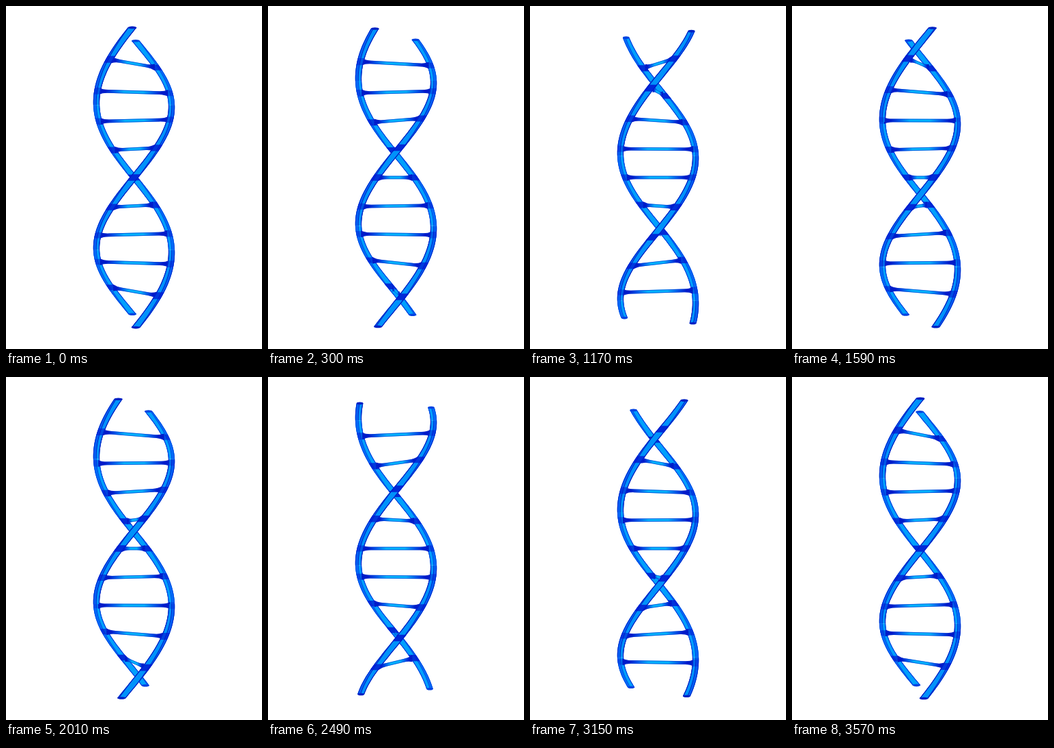
An HTML page with a canvas for the animation above (3600 ms loop, 375 by 500 pixels).

```html
<!DOCTYPE html>
<html lang="en">
<head>
<meta charset="utf-8">
<title>Rotating double helix</title>
<style>
html, body { margin: 0; width: 100%; height: 100%; overflow: hidden; background: #fff; }
canvas { display: block; width: 375px; height: 500px; }
</style>
</head>
<body>
<canvas id="stage" width="375" height="500"></canvas>
<script>
const ctx = document.getElementById('stage').getContext('2d');
const LOOP = 3600, STEP = 30;
const CX = 187.5, CY = 250;
const RADIUS = 55, HALF = 208.5, CAMERA = 1190;
const TWIST = (Math.PI - 0.045) / HALF;   // radians per unit of height
const RUNG_GAP = 41.5;
const FRONT = { core: 'rgb(0,146,250)', flank: 'rgb(0,98,246)', edge: 'rgb(0,32,196)' };
const BACK = { core: 'rgb(0,160,252)', flank: 'rgb(0,108,248)', edge: 'rgb(0,66,226)' };

// Projects the strand centre at height h (upwards) and gives its half-width.
function strandAt(h, turn) {
  const a = h * TWIST + turn;
  const facing = Math.cos(a);
  const scale = CAMERA / (CAMERA - RADIUS * facing);
  return {
    x: CX + RADIUS * Math.sin(a) * scale,
    y: CY - h * scale,
    side: Math.sin(a),
    facing,
    w: (4.6 + 1.5 * facing * facing) * scale
  };
}

// Fills the part of a strand between two heights and two lateral offsets (-1..1).
function band(turn, h0, h1, lo, hi, color) {
  const n = Math.max(4, Math.ceil(Math.abs(h1 - h0) / 3));
  const left = [], right = [];
  for (let i = 0; i <= n; i++) {
    const p = strandAt(h0 + (h1 - h0) * i / n, turn);
    left.push([p.x + lo(p) * p.w, p.y]);
    right.unshift([p.x + hi(p) * p.w, p.y]);
  }
  ctx.fillStyle = color;
  ctx.beginPath();
  for (const [x, y] of left.concat(right)) ctx.lineTo(x, y);
  ctx.closePath();
  ctx.fill();
}

const at = v => () => v;
// Corner of the square tube: it slides inwards as the strand turns sideways.
const leftCorner = p => -1 + 0.85 * Math.max(0, -p.side);
const rightCorner = p => 1 - 0.85 * Math.max(0, p.side);

function drawPiece(turn, h0, h1, { core, flank, edge }) {
  band(turn, h0, h1, at(-1), at(1), core);
  band(turn, h0, h1, at(-1), leftCorner, flank);
  band(turn, h0, h1, rightCorner, at(1), flank);
  band(turn, h0, h1, leftCorner, p => leftCorner(p) + 0.2, edge);
  band(turn, h0, h1, p => rightCorner(p) - 0.2, rightCorner, edge);
  band(turn, h0, h1, at(-1), at(-0.8), edge);
  band(turn, h0, h1, at(0.8), at(1), edge);
}

function drawCap(turn, h, color) {
  const p = strandAt(h, turn);
  ctx.fillStyle = color;
  ctx.beginPath();
  ctx.ellipse(p.x, p.y, p.w, 1.8, 0, 0, 2 * Math.PI);
  ctx.fill();
}

// Draws the parts of one strand that lie in front of, or behind, the axis.
function drawStrand(turn, front) {
  const look = front ? FRONT : BACK;
  const first = Math.floor((turn - HALF * TWIST) / Math.PI + 0.5);
  for (let k = first; ; k++) {
    const h0 = Math.max(-HALF, ((k - 0.5) * Math.PI - turn) / TWIST);
    const h1 = Math.min(HALF, ((k + 0.5) * Math.PI - turn) / TWIST);
    if (h0 >= HALF) break;
    if ((k % 2 === 0) === front) drawPiece(turn, h0, h1, look);
  }
  for (const h of [-HALF, HALF])
    if (strandAt(h, turn).facing > 0 === front) drawCap(turn, h, look.edge);
  for (let i = -4; i <= 4; i++) {
    const h = i * RUNG_GAP, { facing } = strandAt(h, turn);
    if (facing > 0 === front)
      band(turn, h - 4.5, h + 4.5, at(-1), at(1),
        `rgba(0,22,208,${0.3 + 0.55 * Math.abs(facing)})`);
  }
}

function drawRung(h, turn) {
  let l = strandAt(h, turn), r = strandAt(h, turn + Math.PI);
  if (l.x > r.x) [l, r] = [r, l];
  const x0 = l.x + l.w * 0.5, x1 = r.x - r.w * 0.5;
  const len = x1 - x0;
  if (len < 3) return;
  const slope = (r.y - l.y) / (r.x - l.x);
  const mid = x => l.y + (x - l.x) * slope;
  const flare = Math.min(13, len * 0.35);
  const thin = 2.3, thick = 5;

  // One long edge of the rung, on the given side of its centre line.
  const trace = (from, to, side) => {
    const dir = Math.sign(to - from);
    const point = (x, d) => [x, mid(x) + side * d];
    ctx.lineTo(...point(from, thick));
    ctx.quadraticCurveTo(...point(from + dir * flare * 0.4, thin), ...point(from + dir * flare, thin));
    ctx.lineTo(...point(to - dir * flare, thin));
    ctx.quadraticCurveTo(...point(to - dir * flare * 0.4, thin), ...point(to, thick));
  };

  const dark = 'rgb(0,24,200)', blue = 'rgb(0,84,232)', cyan = 'rgb(0,180,252)';
  const g = ctx.createLinearGradient(x0, 0, x1, 0);
  [[0, dark], [0.09, dark], [0.2, blue], [0.36, cyan], [0.64, cyan], [0.8, blue], [0.91, dark], [1, dark]]
    .forEach(([stop, color]) => g.addColorStop(stop, color));
  ctx.fillStyle = g;
  ctx.beginPath();
  trace(x0, x1, -1);
  trace(x1, x0, 1);
  ctx.fill();

  ctx.strokeStyle = 'rgba(0,50,210,0.7)';
  ctx.lineWidth = 0.9;
  for (const d of [-thin + 0.4, thin - 0.4]) {
    ctx.beginPath();
    ctx.moveTo(x0, mid(x0) + d);
    ctx.lineTo(x1, mid(x1) + d);
    ctx.stroke();
  }
}

function draw(now) {
  const t = Math.floor((now % LOOP) / STEP) * STEP;
  const turn = -2 * Math.PI * t / LOOP;
  const turns = [turn, turn + Math.PI];
  ctx.fillStyle = '#fff';
  ctx.fillRect(0, 0, 375, 500);
  for (const a of turns) drawStrand(a, false);
  for (let i = -4; i <= 4; i++) drawRung(i * RUNG_GAP, turn);
  for (const a of turns) drawStrand(a, true);
}

let start;
function tick(now) {
  if (start === undefined) start = now;
  draw(now - start);
  requestAnimationFrame(tick);
}
draw(0);
requestAnimationFrame(tick);
</script>
</body>
</html>
```
